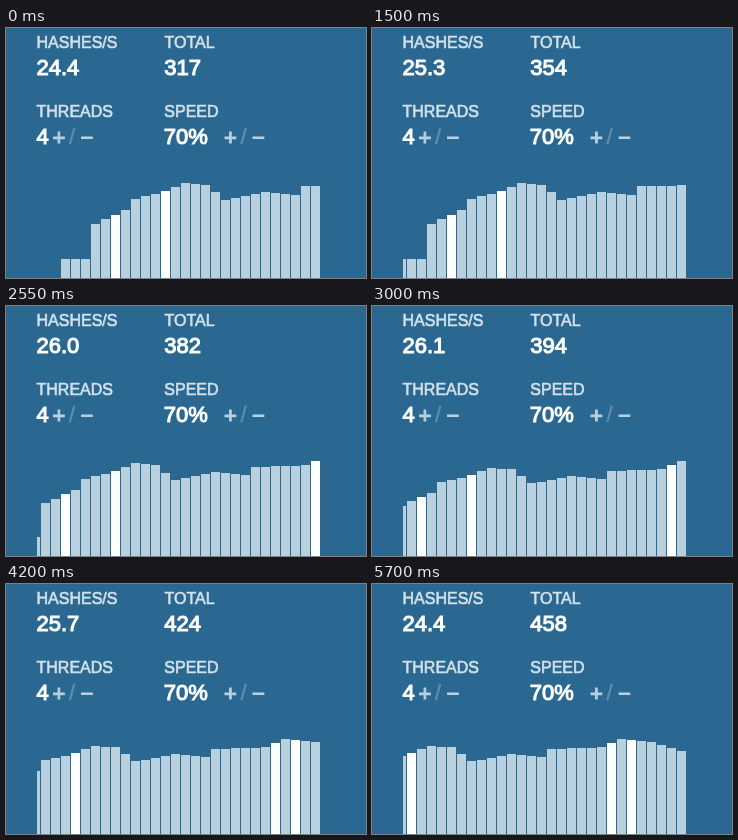
Write an HTML page that moves like this. It is 360 px wide and 250 px high and loops after 5800 ms.

```html
<!DOCTYPE html>
<html lang="en">
<head>
<meta charset="utf-8">
<title>Hash rate</title>
<style>
  html, body { margin: 0; width: 100%; height: 100%; overflow: hidden; background: #2a6891; }
  svg { display: block; }
  text { font: 22px "Liberation Sans", Arial, Helvetica, sans-serif; stroke: currentColor; fill: currentColor; }
  .label { font-size: 16px; color: #d2e1ea; stroke-width: .65px; }
  .value { color: #fff; stroke-width: 1.1px; }
  .button { color: #b9d0de; stroke-width: 1.1px; }
  .slash { color: #5f8fad; stroke-width: .5px; }
  #bars { fill: #b9d0de; shape-rendering: crispEdges; }
  #bars .found { fill: #fff; }
</style>
</head>
<body>
<svg width="360" height="250" viewBox="0 0 360 250">
  <clipPath id="graph"><rect x="31" y="150" width="283" height="100"/></clipPath>
  <text class="label" x="30.5" y="20">HASHES/S</text>
  <text class="label" x="158.6" y="20">TOTAL</text>
  <text class="value" x="30.5" y="47" id="rate">24.4</text>
  <text class="value" x="158.3" y="47" id="total">317</text>

  <text class="label" x="30.5" y="89">THREADS</text>
  <text class="label" x="158.3" y="89">SPEED</text>
  <text class="value" x="30.5" y="116">4</text>
  <text class="value" x="157.8" y="116">70%</text>

  <g id="buttons">
    <text class="button" x="46.5" y="117">+</text>
    <text class="slash" x="63" y="116">/</text>
    <text class="button" x="74.5" y="117">−</text>
  </g>
  <use href="#buttons" x="171.5"/>
  <g id="bars" clip-path="url(#graph)"></g>
</svg>
<script>
const LOOP = 5800, STEP = 150, PUSH = 500, PHASE = 350;
const START = 26, BARS = 38, VISIBLE = 29;
const MAX_H = 95, PITCH = 10, LAST_X = 305;

// turning points of the bar profile: [bar, height]
const profile = [
  [0, 19], [2, 19], [3, 54], [6, 68], [7, 79], [10, 87], [12, 95], [14, 93],
  [16, 78], [20, 86], [23, 83], [24, 91.5], [29, 93], [31, 102.1], [34, 98.9], [37, 89.2]
];
const found = new Set([5, 10, 30, 32]);

const $ = id => document.getElementById(id);
const rateText = $("rate"), totalText = $("total");

function level(i) {
  const k = Math.max(1, profile.findIndex(p => p[0] >= i));
  const [x0, y0] = profile[k - 1], [x1, y1] = profile[k];
  return y0 + (y1 - y0) * (i - x0) / (x1 - x0);
}

const levels = Array.from({ length: BARS }, (_, i) => level(i));
const bars = levels.map((_, i) => {
  const bar = document.createElementNS("http://www.w3.org/2000/svg", "rect");
  bar.setAttribute("width", PITCH - 1);
  if (found.has(i)) bar.setAttribute("class", "found");
  return $("bars").appendChild(bar);
});

// steady at first, then a rise and fall around 3 s
const rateAt = s => Math.max(24.4, 26.13 - 0.3525 * (s - 3.05) ** 2);

// near-linear count that runs slightly ahead mid-loop
const totalAt = s => 317.3 + 24.74 * s + 3.4 * Math.sin(Math.PI * (s / 5.7) ** 1.5) ** 2;

function draw(t) {
  const count = START + Math.floor((t + PHASE) / PUSH);
  const peak = Math.max(...levels.slice(Math.max(0, count - VISIBLE), count));
  bars.forEach((bar, i) => {
    const h = i < count ? Math.round(levels[i] / peak * MAX_H) : 0;
    bar.setAttribute("x", LAST_X - (count - 1 - i) * PITCH);
    bar.setAttribute("y", 250 - h);
    bar.setAttribute("height", h);
  });
  rateText.textContent = rateAt(t / 1000).toFixed(1);
  totalText.textContent = Math.floor(totalAt(t / 1000));
}

let shown = -1;
const begin = performance.now();
function tick() {
  const t = Math.floor((performance.now() - begin) % LOOP / STEP) * STEP;
  if (t !== shown) draw(shown = t);
  requestAnimationFrame(tick);
}
tick();
</script>
</body>
</html>
```
